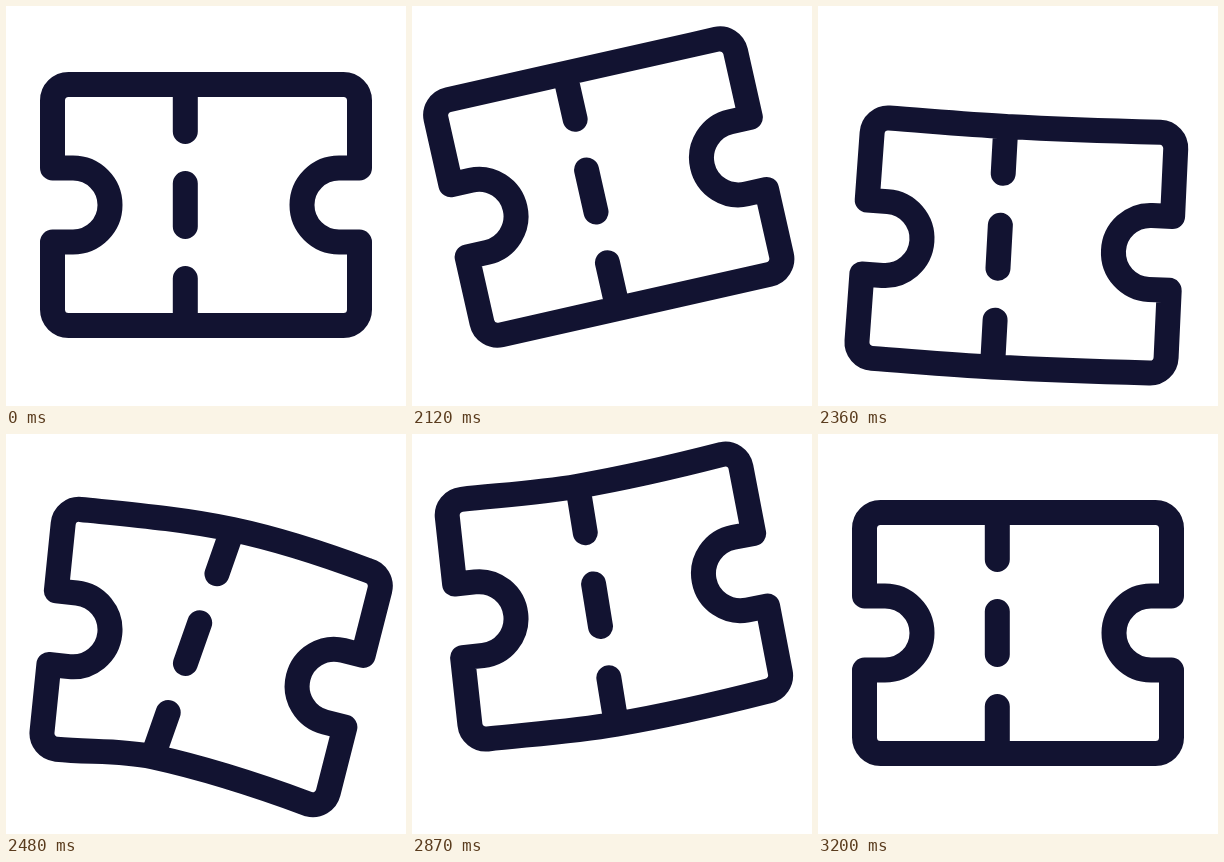
These frames come from a looping animation (400 by 400 pixels, 3.23 s). An HTML page:

```html
<!DOCTYPE html>
<html lang="en">
<head>
<meta charset="utf-8">
<title>Ticket</title>
<style>
  html, body { margin: 0; height: 100%; overflow: hidden; background: #fff; }
  svg { display: block; width: 100vw; height: 100vh; }
  path { fill: none; stroke: #121331; stroke-width: 25; stroke-linecap: round; stroke-linejoin: round; }
</style>
</head>
<body>
<svg viewBox="0 0 400 400"><path id="ticket"/></svg>
<script>
const LOOP = 3230, START = 2000, STEP = 30, LAST = 40;
const HALF = 120.5, NOTCH = 37, CORNER = 16, SIDE = 20.5;
const LEFT = 67, SPAN = 266, FOLD = 179.3;

// Swings between turning points [step, value]
const height = swing([0, 199], [4.8, 180], [12.9, 241], [25.2, 153], [LAST, 199]);
const tilt = swing([0, 0], [6.5, -17.6], [15.8, 12.3], [27.5, -10.3], [LAST, 0]);
const bend = swing([4, 0], [8, -9.5], [17.5, 9], [28, -4.6], [38, 0]);

function swing(...keys) {
  return step => {
    let value = keys[0][1];
    for (let i = 1; i < keys.length; i++) {
      const [from, a] = keys[i - 1], [to, b] = keys[i];
      const u = Math.min(1, Math.max(0, (step - from) / (to - from)));
      value += (b - a) * (1 - Math.cos(Math.PI * u ** 0.9)) / 2;
    }
    return value;
  };
}

const rad = deg => deg * Math.PI / 180;

// Returns a function placing local points around a turned centre
function placer(cx, cy, deg) {
  const s = Math.sin(rad(deg)), c = Math.cos(rad(deg));
  return (x, y) => [cx + x * c - y * s, cy + x * s + y * c];
}

const text = p => p.map(v => v.toFixed(2)).join(' ');
const move = p => 'M' + text(p);
const line = (...pts) => pts.map(p => 'L' + text(p)).join('');
const cubic = (...pts) => 'C' + pts.map(text).join(' ');
const arc = (r, sweep, p) => `A${r} ${r} 0 0 ${sweep} ${text(p)}`;
const angle = (a, b) => Math.atan2(b[1] - a[1], b[0] - a[0]);
const along = (p, dir, len) => [p[0] + Math.cos(dir) * len, p[1] + Math.sin(dir) * len];

// Control points of a long edge from left to right: it leaves along the left
// half, passes the fold parallel to the whole edge and curls on to the right
function edge(a, m, b, start) {
  const mid = angle(a, b), seg = angle(m, b), end = seg + 0.75 * (seg - mid);
  const l1 = Math.hypot(m[0] - a[0], m[1] - a[1]) / 3;
  const l2 = Math.hypot(b[0] - m[0], b[1] - m[1]) / 3;
  return [a, along(a, start, l1), along(m, mid, -l1), m,
          along(m, mid, l2), along(b, end, -l2), b];
}
const trace = p => cubic(p[1], p[2], p[3]) + cubic(p[4], p[5], p[6]);

function outline(step) {
  const c = tilt(step), b = bend(step), y = height(step), curl = Math.abs(b);
  const rise = SPAN * Math.sin(rad(c));
  const dx = SPAN * Math.cos(rad(c)) + 0.15 * b;
  const ly = y - rise / 2, la = c - 0.8 * b;
  const fx = FOLD + 1.1 * curl - 0.2 * b;
  const fy = ly + rise * (fx - LEFT) / dx - 1.55 * b;

  const L = placer(LEFT, ly, la);
  const R = placer(LEFT + dx, ly + rise, c + 0.25 * b);
  const F = placer(fx, fy, c + 0.5 * curl + 0.38 * b);

  const inset = SIDE - CORNER, shoulder = HALF - CORNER;
  const long = h => edge(L(-inset, h), F(0, h), R(inset, h), rad(la));
  const dash = (from, to) => move(F(0, from)) + line(F(0, to));
  // One short side with its notch; s is 1 going down, -1 going up
  const side = (P, s) =>
    arc(CORNER, 1, P(s * SIDE, -s * shoulder)) +
    line(P(s * SIDE, -s * NOTCH), P(0, -s * NOTCH)) +
    arc(NOTCH, 0, P(-s * NOTCH, 0)) + arc(NOTCH, 0, P(0, s * NOTCH)) +
    line(P(s * SIDE, s * NOTCH), P(s * SIDE, s * shoulder)) +
    arc(CORNER, 1, P(s * inset, s * HALF));

  return move(L(-inset, -HALF)) + trace(long(-HALF)) + side(R, 1) +
    trace(long(HALF).reverse()) + side(L, -1) + 'Z' +
    dash(-HALF, -73.5) + dash(-21.5, 21.5) + dash(73.5, HALF);
}

const ticket = document.getElementById('ticket');
const began = performance.now();

function draw(now) {
  const t = Math.max(0, now - began) % LOOP;
  const step = Math.min(LAST, Math.max(0, Math.floor((t - START) / STEP)));
  ticket.setAttribute('d', outline(step));
  requestAnimationFrame(draw);
}
draw(began);
</script>
</body>
</html>
```
